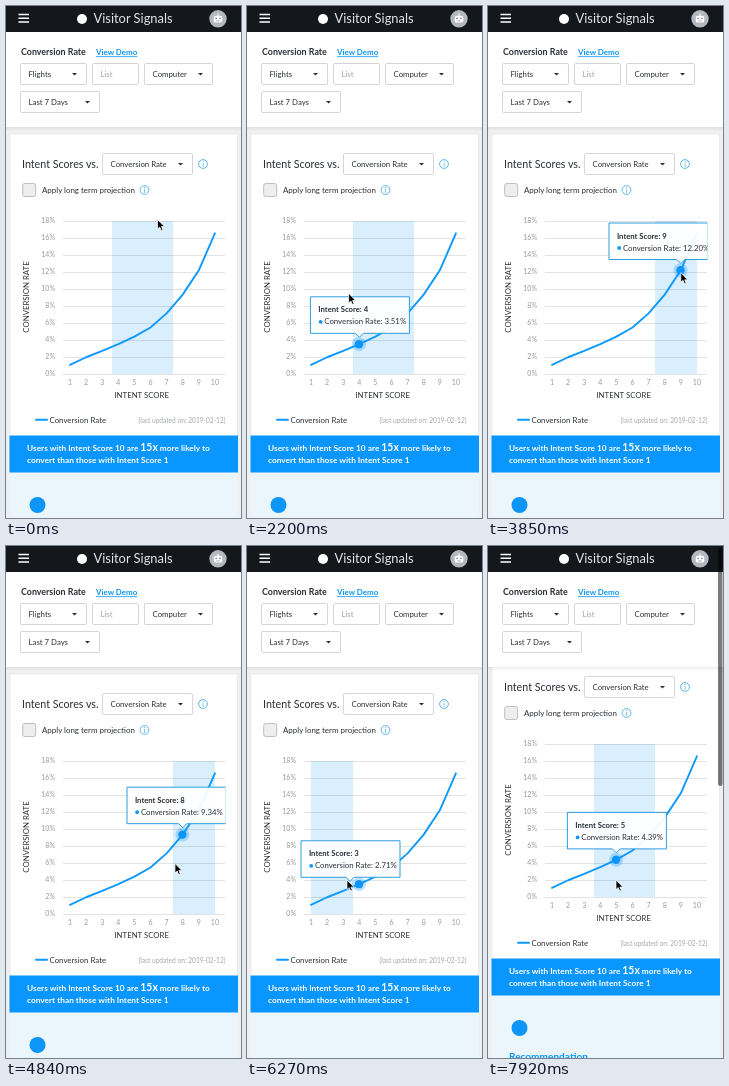
These frames come from a looping animation (235x512 px, 8 s). An HTML page:

```html
<!DOCTYPE html>
<html lang="en">
<head>
<meta charset="utf-8">
<title>Conversion dashboard</title>
<style>
  html, body { margin: 0; width: 100%; height: 100%; overflow: hidden; background: #f0f0f1; }
  svg { display: block; width: 235px; height: 512px; font-family: Lato, "Open Sans", sans-serif; fill: #2b2f36; }
  .bold { font-weight: 700; }
  .blue { fill: #0d96f8; }
  .field { fill: #fff; stroke: #d4d6d9; }
  .info circle { fill: none; stroke: #3aa5e8; stroke-width: .8; }
  .info text { fill: #3aa5e8; font-size: 7px; text-anchor: middle; }
  .axis { fill: #999; font-size: 7px; }
  .title { font-size: 7.8px; text-anchor: middle; }
</style>
</head>
<body>
<svg viewBox="0 0 235 512">
  <defs>
    <clipPath id="chartClip"><rect x="4" y="150" width="215.5" height="260"/></clipPath>
    <linearGradient id="shade" x2="0" y2="1">
      <stop stop-color="#000" stop-opacity=".07"/><stop offset="1" stop-color="#000" stop-opacity="0"/>
    </linearGradient>
  </defs>
  <rect width="235" height="512" fill="#f0f0f1"/>

  <g id="page">
    <rect x="4" y="128" width="227.5" height="420" fill="#fff" stroke="#e8e9ea" stroke-width=".8"/>
    <text x="16" y="161.5" font-size="10.7">Intent Scores vs.</text>
    <g id="metric"></g>
    <rect x="16.7" y="177.5" width="13" height="13" rx="2" fill="#eee" stroke="#bcbfc3"/>
    <text x="36" y="187" font-size="7.95">Apply long term projection</text>
    <g class="info" transform="translate(197 158)"><circle r="4.4"/><text y="2.5">i</text></g>
    <g class="info" transform="translate(138.5 184)"><circle r="4.4"/><text y="2.5">i</text></g>

    <rect id="band" y="215" height="153" fill="#daeffd"/>
    <g id="grid"></g>
    <text class="title" x="135.7" y="391.7">INTENT SCORE</text>
    <text class="title" transform="translate(23 291) rotate(-90)">CONVERSION RATE</text>
    <polyline id="curve" fill="none" stroke="#0d99ff" stroke-width="1.9" stroke-linejoin="round" stroke-linecap="round"/>

    <path d="M30 413.8H41" stroke="#0d99ff" stroke-width="2" stroke-linecap="round"/>
    <text x="43.5" y="416.5" font-size="7.85">Conversion Rate</text>
    <text x="219.5" y="416.5" font-size="6.6" fill="#a3a6aa" text-anchor="end">(last updated on: 2019-02-12)</text>

    <rect x="3.5" y="466" width="228.5" height="90" fill="#ebf6fc"/>
    <rect x="3.5" y="429.5" width="228.5" height="37" fill="#0a96ff"/>
    <g class="bold" style="fill:#fff" font-size="8.3">
      <text x="21" y="445">Users with Intent Score 10 are <tspan font-size="10.4">15x</tspan> more likely to</text>
      <text x="21" y="457.3">convert than those with Intent Score 1</text>
    </g>
    <g id="advice">
      <circle class="blue" cx="31.5" cy="499" r="8"/>
      <text class="bold blue" x="21" y="530.5" font-size="10.1">Recommendation</text>
    </g>

    <g id="marker" class="blue"><circle r="7" opacity=".28"/><circle r="4.2"/></g>
    <g clip-path="url(#chartClip)">
      <g id="tip">
        <path id="bubble" fill="#fff" fill-opacity=".93" stroke="#2d9ee0"/>
        <text id="tipScore" class="bold" x="8.4" y="16.2" font-size="7.7"></text>
        <circle class="blue" cx="10.7" cy="25.5" r="1.9"/>
        <text id="tipRate" x="14.4" y="28.2" font-size="7.8"></text>
      </g>
    </g>
  </g>

  <rect y="121" width="235" height="4" fill="url(#shade)"/>
  <rect y="26" width="235" height="95" fill="#fff"/>
  <text class="bold" x="15" y="49" font-size="8.9">Conversion Rate</text>
  <text class="bold blue" x="90" y="49.3" font-size="7.95" text-decoration="underline">View Demo</text>
  <g id="filters"></g>

  <rect width="235" height="26" fill="#14171c"/>
  <path d="M12.5 8.5H23M12.5 12.3H23M12.5 16H23" stroke="#fff" stroke-width="1.6"/>
  <circle cx="76" cy="13" r="5" fill="#fff"/>
  <text x="87.5" y="17.3" font-size="12.9" style="fill:#e4e6e9">Visitor Signals</text>
  <circle cx="212" cy="12.8" r="8.7" fill="#b4b8bf"/>
  <path d="M212 7.5V10" stroke="#fff"/>
  <rect x="207.7" y="9.8" width="8.6" height="6.8" rx="2.2" fill="#fff"/>
  <path d="M210.1 12.3h.1M213.9 12.3h.1" stroke="#858a93" stroke-width="1.7" stroke-linecap="round"/>
  <path d="M210.4 14.9H213.6" stroke="#858a93" stroke-width=".7"/>

  <rect id="scrollbar" x="230" y="2" width="4.5" height="238" rx="2.2" fill="#000" fill-opacity=".52"/>
  <path id="cursor" d="M0 0V9.6L2.2 7.6L3.7 11L5.3 10.3L3.9 7.1H6.9Z" fill="#000" stroke="#fff" stroke-width=".7"/>
</svg>

<script>
const $ = id => document.getElementById(id);
const LOOP = 8000, STEP = 110, TIP_START = 440;
const rates = [1.08, 1.97, 2.71, 3.51, 4.39, 5.47, 7.13, 9.34, 12.2, 16.55];
const px = n => 64 + 16.1 * (n - 1);
const py = rate => 368 - 8.5 * rate;
const clamp01 = v => Math.max(0, Math.min(1, v));
const easeOut = v => 1 - (1 - clamp01(v)) ** 3;
const mix = (a, b, k) => a + (b - a) * k;

// Form fields: x, y, width, label, has arrow
function field(x, y, w, label, arrow = true) {
  const ax = x + w - 12.5, ay = y + 10;
  return `<rect class="field" x="${x + .5}" y="${y + .5}" width="${w - 1}" height="21" rx="1.5"/>
    <text x="${x + 8.5}" y="${y + 14}" font-size="7.8"${arrow ? '' : ' style="fill:#a0a3a8"'}>${label}</text>` +
    (arrow ? `<path d="M${ax - 2.5} ${ay}h5l-2.5 2.6z"/>` : '');
}
$('metric').innerHTML = field(96, 147, 91, 'Conversion Rate');
$('filters').innerHTML = field(14, 57, 67, 'Flights') + field(86, 57, 47, 'List', false) +
  field(138, 57, 69, 'Computer') + field(14, 85, 80, 'Last 7 Days');

// Chart scaffolding
let grid = '';
for (let r = 0; r <= 18; r += 2) {
  grid += `<path d="M57 ${py(r) + .5}H219" stroke="#000" stroke-opacity=".14" stroke-width=".8"/>
    <text class="axis" x="49" y="${py(r) + 2.3}" text-anchor="end">${r}%</text>`;
}
rates.forEach((_, i) => {
  grid += `<text class="axis" x="${px(i + 1)}" y="379" text-anchor="middle">${i + 1}</text>`;
});
$('grid').innerHTML = grid;
$('curve').setAttribute('points', rates.map((r, i) => px(i + 1) + ',' + py(r)).join(' '));

// Pointer path: time, x, y
const path = [
  [0, 151.5, 213.5], [110, 151.5, 213.5], [220, 148, 240], [440, 146, 246], [770, 140, 255],
  [1390, 137.5, 258], [1430, 131.5, 259], [1870, 126, 270], [2250, 98, 290], [2500, 100, 290],
  [2860, 140, 283], [3190, 168, 270], [3630, 190, 255], [4100, 196, 280], [4500, 190, 305],
  [4840, 169, 317.5], [5050, 160, 322], [5500, 158, 325], [5900, 128, 333], [6200, 101, 334],
  [6270, 100, 334], [6500, 96, 336], [6900, 140, 336], [7120, 158, 335], [7250, 138, 335],
  [7400, 128, 334], [8000, 128, 334]
];
function pointer(t) {
  const i = Math.max(1, path.findIndex(p => p[0] >= t));
  const a = path[i - 1], b = path[i], k = (t - a[0]) / (b[0] - a[0]);
  return [mix(a[1], b[1], k), mix(a[2], b[2], k)];
}

// Hovered score changes, derived from the pointer
const segment = n => n <= 3 ? 0 : n <= 7 ? 1 : 2;
const bands = [[64, 106], [106, 167], [167, 209]];
const hovers = [], switches = [{ t: -1000, s: 1 }];
for (let t = TIP_START; t < LOOP; t += 5) {
  const n = Math.round((pointer(t)[0] - 64) / 16.1) + 1;
  const last = hovers[hovers.length - 1];
  if (last && last.n === n) continue;
  const at = last ? t + 40 : t;
  hovers.push({ t: at, n });
  if (segment(n) !== switches[switches.length - 1].s) switches.push({ t: at, s: segment(n) });
}
const lastIndex = (list, t) => {
  let i = list.length - 1;
  while (i > 0 && list[i].t > t) i--;
  return i;
};
const tipSpot = n => [Math.min(px(n) - 49.5, 120.5), py(rates[n - 1]) - 47.8];
const move = (id, x, y) => $(id).setAttribute('transform', `translate(${x} ${y})`);

function drawTip(t) {
  const visible = t < TIP_START ? 0 : clamp01((t - TIP_START + STEP) / 220);
  $('tip').setAttribute('opacity', visible);
  $('marker').setAttribute('opacity', visible);
  const i = lastIndex(hovers, t), now = hovers[i], before = hovers[Math.max(0, i - 1)];
  const k = easeOut((t - now.t) / 260);
  const from = tipSpot(before.n), to = tipSpot(now.n);
  const x = mix(from[0], to[0], k), y = mix(from[1], to[1], k);
  const notch = mix(px(before.n), px(now.n), k) - x;
  move('tip', x, y);
  $('bubble').setAttribute('d', `M.5.5H99.5V37H${notch + 4}l-4 4l-4-4H.5Z`);
  $('tipScore').textContent = `Intent Score: ${now.n}`;
  $('tipRate').textContent = `Conversion Rate: ${rates[now.n - 1].toFixed(2)}%`;
  const m = hovers[lastIndex(hovers, t - 100)].n;
  move('marker', px(m) - .3, py(rates[m - 1]));
}

function draw(t) {
  const [cx, cy] = pointer(t);
  move('cursor', cx, cy);
  drawTip(t);

  const sw = switches[lastIndex(switches, t)], [left, right] = bands[sw.s];
  $('band').setAttribute('x', left);
  $('band').setAttribute('width', right - left);
  const k = easeOut((t - sw.t - 90) / 300);
  $('advice').setAttribute('opacity', k);
  move('advice', 0, 12 * (1 - k));

  const scroll = clamp01((t - 7590) / 330);
  move('page', 0, -17 * scroll);
  $('scrollbar').setAttribute('opacity', scroll > 0 ? 1 : 0);
}

function tick() {
  const t = performance.now() % LOOP;
  draw(Math.floor(t / STEP) * STEP);
  requestAnimationFrame(tick);
}
tick();
</script>
</body>
</html>
```
